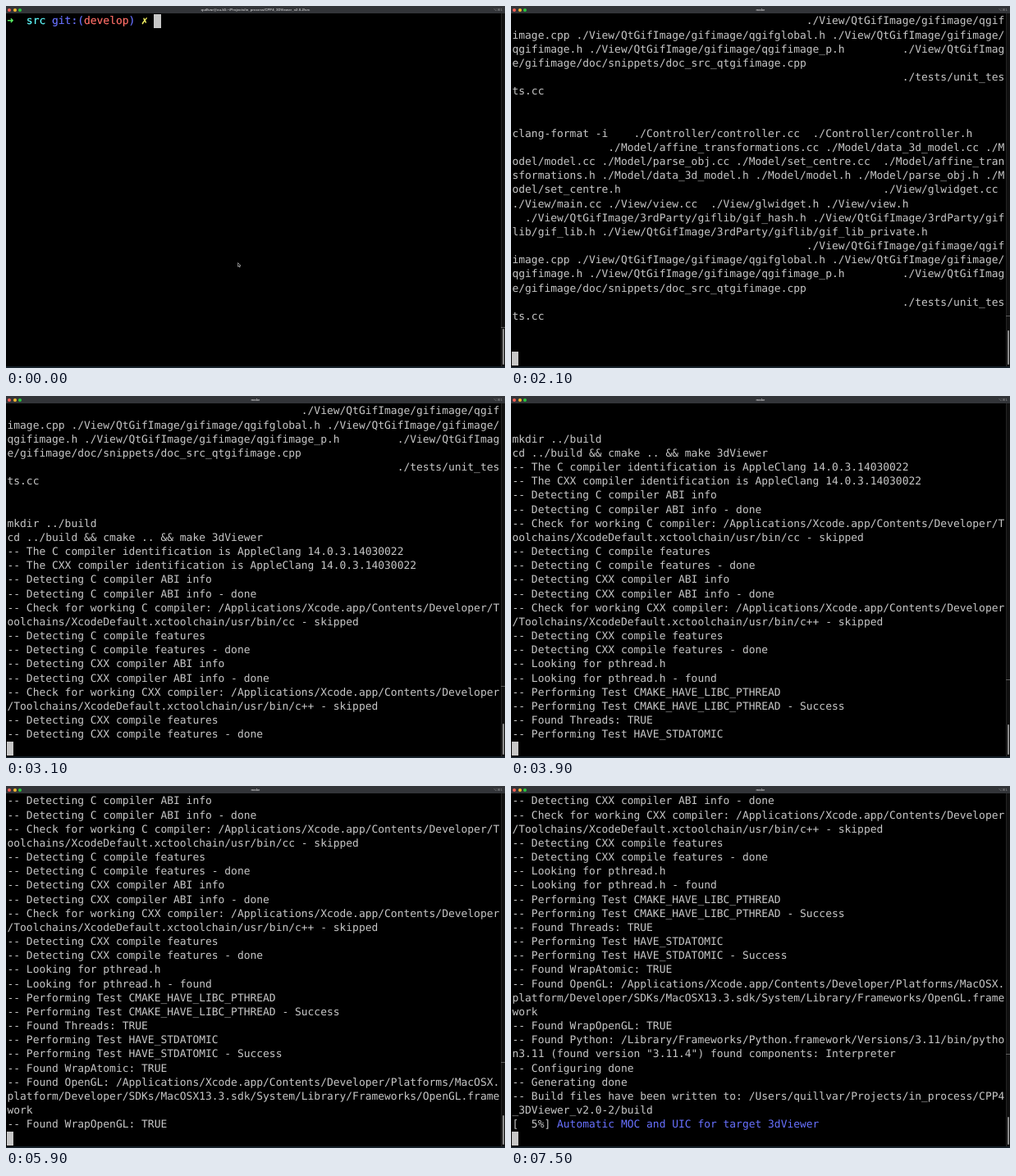
An HTML page for the animation above (8 s loop, 608x442 px).

```html
<!DOCTYPE html>
<html lang="en">
<head>
<meta charset="utf-8">
<title>Terminal build</title>
<style>
html, body { margin: 0; width: 100%; height: 100%; overflow: hidden; background: #000; }
#stage { position: relative; width: 608px; height: 442px; overflow: hidden; background: #000; }
#stage > * { position: absolute; }
#bar { left: 0; top: 0; width: 608px; height: 9px; background: #323438;
  font: bold 4.3px/9px "Liberation Sans", Arial, sans-serif; color: #bdbdbf; text-align: center; }
#bar i { position: absolute; top: 2.5px; width: 4px; height: 4px; border-radius: 50%; }
#keys { position: absolute; right: 3px; top: 0; font: 4px/9px "DejaVu Sans", sans-serif; color: #909092; }
#screen { left: 1.5px; top: 10.4px; margin: 0; white-space: pre; color: #c7c7c7;
  font: 12.955px/17.17px "DejaVu Sans Mono", monospace; text-rendering: geometricPrecision; }
#screen i { font-style: normal; }
#screen b { font-weight: normal; -webkit-text-stroke: .2px currentColor; }
.cell { display: inline-block; width: 1ch; }
.cursor { display: inline-block; width: 8.2px; height: 17.2px; margin: -.7px 0 0 -.3px; background: #c7c7c7; vertical-align: top; }
.green { color: #5ffa68; } .cyan { color: #60fdff; } .blue { color: #6871ff; }
.red { color: #ff6e67; } .yellow { color: #fffc67; }
#track { left: 603px; top: 9px; width: 4px; height: 431px; background: #101010; border-left: 1px solid #242424; }
#thumb { left: 604.5px; width: 2.5px; border-radius: 1.3px; background: #8c8c8c; }
#mark { left: 603px; width: 5px; height: 1px; background: #5c5c5c; }
#edge { left: 0; top: 440px; width: 608px; height: 2px; background: #17222b; }
#mouse { left: 282px; top: 313px; }
</style>
</head>
<body>
<div id="stage">
  <div id="bar">
    <i style="left:2.2px;background:#ff5f57"></i><i style="left:8.6px;background:#febc2e"></i><i style="left:15px;background:#28c840"></i>
    <span id="title"></span><span id="keys">⌥⌘1</span>
  </div>
  <pre id="screen"></pre>
  <div id="track"></div><div id="thumb"></div><div id="mark"></div><div id="edge"></div>
  <svg id="mouse" width="5" height="7"><path d="M.6.6V5.2L1.7 4.3L2.4 6L3.2 5.6L2.5 4H4Z" fill="#000" stroke="#ddd" stroke-width=".6"/></svg>
</div>
<script>
const LOOP = 8000, COLS = 77, ROWS = 24;
const $ = id => document.getElementById(id);
const gap = n => ' '.repeat(n);
const list = (dir, names) => names.split(' ').map(n => dir + n).join(' ');

const lib = './View/QtGifImage/3rdParty/giflib/', gif = './View/QtGifImage/gifimage/';
const sources = gap(4) + './Controller/controller.cc  ./Controller/controller.h' + gap(20) +
  list('./Model/', 'affine_transformations.cc data_3d_model.cc model.cc parse_obj.cc set_centre.cc') + gap(2) +
  list('./Model/', 'affine_transformations.h data_3d_model.h model.h parse_obj.h set_centre.h') + gap(41) +
  list('./View/', 'glwidget.cc main.cc view.cc') + gap(2) + list('./View/', 'glwidget.h view.h') + gap(17) +
  list(lib, 'gif_hash.h gif_lib.h gif_lib_private.h') + gap(58) +
  list(gif, 'qgifimage.cpp qgifglobal.h qgifimage.h qgifimage_p.h') + gap(9) +
  gif + 'doc/snippets/doc_src_qtgifimage.cpp' + gap(92) + './tests/unit_tests.cc';

const xcode = '/Applications/Xcode.app/Contents/Developer/';
const found = (lang, bin) => [
  `-- Detecting ${lang} compiler ABI info - done`,
  `-- Check for working ${lang} compiler: ${xcode}Toolchains/XcodeDefault.xctoolchain/usr/bin/${bin} - skipped`,
  `-- Detecting ${lang} compile features`,
  `-- Detecting ${lang} compile features - done`];
const compiler = lang => `-- The ${lang} compiler identification is AppleClang 14.0.3.14030022`;

// Output bursts: [time in ms, lines]
const output = [
  [1800, ['rm -rf ../build']],
  [1900, ['clang-format -n' + sources, '', '']],
  [2100, ['clang-format -i' + sources, '', '']],
  [2300, ['mkdir ../build', 'cd ../build && cmake .. && make 3dViewer']],
  [2500, [compiler('C')]],
  [2700, [compiler('CXX'), '-- Detecting C compiler ABI info']],
  [2900, [...found('C', 'cc'), '-- Detecting CXX compiler ABI info']],
  [3100, found('CXX', 'c++')],
  [3200, ['-- Looking for pthread.h']],
  [3500, ['-- Looking for pthread.h - found', '-- Performing Test CMAKE_HAVE_LIBC_PTHREAD']],
  [3800, ['-- Performing Test CMAKE_HAVE_LIBC_PTHREAD - Success', '-- Found Threads: TRUE', '-- Performing Test HAVE_STDATOMIC']],
  [4200, ['-- Performing Test HAVE_STDATOMIC - Success', '-- Found WrapAtomic: TRUE',
    `-- Found OpenGL: ${xcode}Platforms/MacOSX.platform/Developer/SDKs/MacOSX13.3.sdk/System/Library/Frameworks/OpenGL.framework`,
    '-- Found WrapOpenGL: TRUE']],
  [7000, ['-- Found Python: /Library/Frameworks/Python.framework/Versions/3.11/bin/python3.11 (found version "3.11.4") found components: Interpreter']],
  [7100, ['-- Configuring done']],
  [7300, ['-- Generating done', '-- Build files have been written to: /Users/quillvar/Projects/in_process/CPP4_3DViewer_v2.0-2/build']],
  [7400, ['[  5%] <i class=blue>Automatic MOC and UIC for target 3dViewer</i>']]
];
const wrap = line => line.match(new RegExp(`.{1,${COLS}}`, 'g')) || [''];
const prompt = '<b><i class="cell green">➜</i>  <i class=cyan>src</i> <i class=blue>git:(</i><i class=red>develop</i>' +
  '<i class=blue>)</i> <i class="cell yellow">✗</i></b> ';

let shown = '';
function frame(now) {
  const t = now % LOOP;
  const typed = t < 1000 ? 0 : Math.min(4, Math.floor((t - 900) / 100));
  const bursts = output.filter(([at]) => t >= at);
  const key = typed + '/' + bursts.length;

  $('mouse').style.display = t < 100 ? '' : 'none';
  if (key !== shown) {
    shown = key;
    const lines = [prompt + 'make'.slice(0, typed), ...bursts.flatMap(b => b[1]).flatMap(wrap)];
    if (bursts.length) lines.push('');
    const top = Math.max(0, lines.length - 1 - ROWS);
    $('screen').innerHTML = lines.slice(top).join('\n') + '<i class=cursor></i>';
    $('title').textContent = bursts.length ? 'make' : 'quillvar@xu-k5:~/Projects/in_process/CPP4_3DViewer_v2.0-2/src';
    const thumbTop = 394 + .22 * top;
    $('thumb').style.top = thumbTop + 'px';
    $('thumb').style.height = 438 - thumbTop + 'px';
    $('mark').style.top = 392 - 1.45 * top + 'px';
  }
  requestAnimationFrame(frame);
}
frame(0);
</script>
</body>
</html>
```
